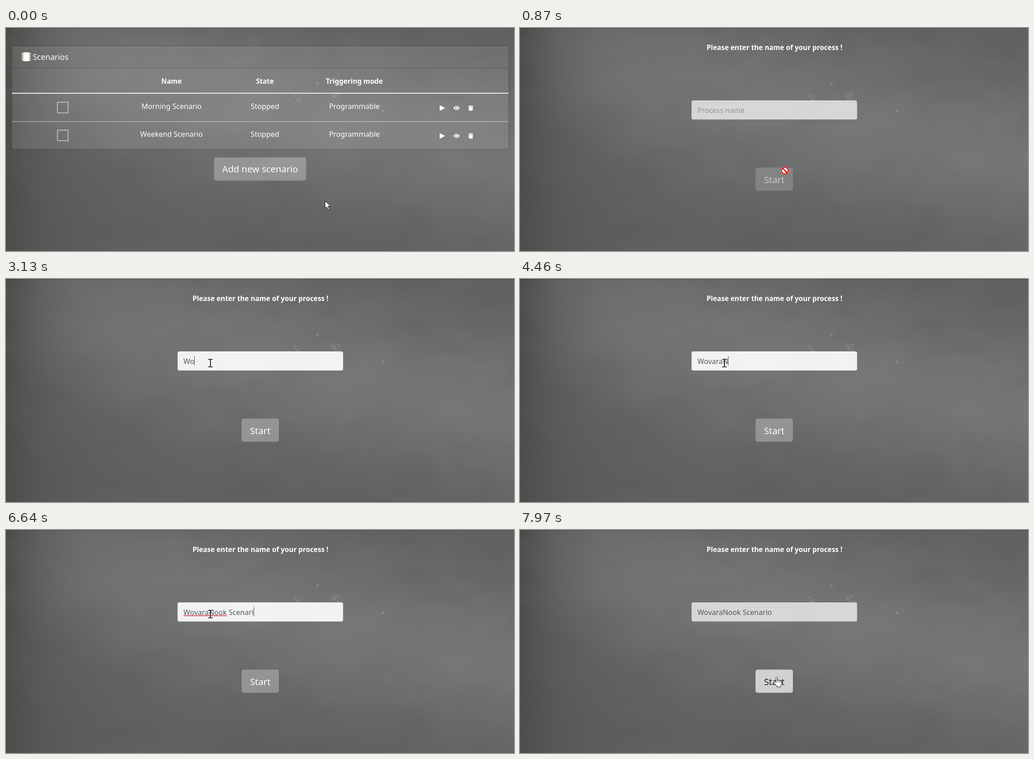
An HTML page with a canvas for the animation above (8000 ms loop, 1128 by 496 pixels).

```html
<!DOCTYPE html>
<html lang="en">
<head>
<meta charset="utf-8">
<title>New scenario</title>
<style>
html, body { margin: 0; width: 100%; height: 100%; overflow: hidden; background: #666; }
canvas { display: block; }
</style>
</head>
<body>
<canvas id="stage" width="1128" height="496"></canvas>
<script>
const W = 1128, H = 496, LOOP = 8000;
const ctx = document.getElementById('stage').getContext('2d');
const FONT = '"Noto Sans", "Open Sans", sans-serif';
const NAME = 'WovaraNook Scenario', WORD = 'WovaraNook';

const PAGE_SWITCH = 790, FOCUS = 1490, CARET_ON = 1570, ENABLE = 2660, HOVER = 7500, BLUR = 7740;
const keyTimes = [2660, 3130, 3300, 3680, 3870, 4060, 4460, 4640, 4820, 5000, 5300,
  5620, 5790, 5960, 6130, 6300, 6470, 6640, 6800];
const path = [[80, 708, 384], [500, 588, 317], [960, 588, 317], [1460, 454, 187],
  [7250, 454, 187], [7500, 594, 333], [7570, 590, 332], [7720, 570, 327]];

const clamp = v => Math.max(0, Math.min(1, v));
const mix = (a, b, k) => a + (b - a) * k;
const smooth = k => k * k * (3 - 2 * k);
const ramp = (t, start, length) => clamp((t - start) / length);
const white = a => `rgba(255,255,255,${a})`;
const gray = v => `rgb(${v},${v},${v})`;

function hash(i, j) {
  const s = Math.sin(i * 127.1 + j * 311.7) * 43758.5453;
  return s - Math.floor(s);
}

function noise(x, y) {
  const i = Math.floor(x), j = Math.floor(y), u = smooth(x - i), v = smooth(y - j);
  return mix(mix(hash(i, j), hash(i + 1, j), u), mix(hash(i, j + 1), hash(i + 1, j + 1), u), v) - 0.5;
}

// Worn wall: a slanted light band, dark left side, blocky smudges.
function wallShade(x, y) {
  const bx = Math.floor(x / 6), by = Math.floor(y / 5);
  const warp = noise(bx / 7, by / 5) * 44 + (hash(bx, by) - 0.5) * 10;
  const px = Math.max(0, x + warp * 0.3), py = y + warp;
  const d = (py - 130 - (px - 300) * 0.2) / 170;
  const band = 96 + 21 * Math.exp(-d * d);
  return mix(77, band, 1 - Math.exp(-px / 110)) + noise(x / 90, y / 50) * 4 + noise(x / 5, y / 4);
}

function makeWall() {
  const wall = document.createElement('canvas');
  wall.width = W;
  wall.height = H;
  const c = wall.getContext('2d');
  const image = c.createImageData(W, H);
  for (let y = 0, p = 0; y < H; y++) {
    for (let x = 0; x < W; x++, p += 4) {
      const l = wallShade(x, y);
      image.data[p] = image.data[p + 1] = l;
      image.data[p + 2] = l + (x < 75 ? -1 : 1);
      image.data[p + 3] = 255;
    }
  }
  c.putImageData(image, 0, 0);
  c.fillStyle = 'rgba(0,0,0,.28)';
  c.fillRect(0, 0, W, 1);
  c.fillStyle = white(0.13);
  for (const [x, y, n] of [[731, 151, 14], [645, 154, 10], [690, 122, 4], [835, 183, 4]]) {
    for (let i = 0; i < n; i++) {
      c.fillRect(x + (hash(i, x) - 0.5) * n * 1.5, y + (hash(x, i) - 0.5) * n * 1.3, 4, 2);
    }
  }
  return wall;
}
const wall = makeWall();

function text(str, x, y, size, color, align = 'center', weight = 400) {
  ctx.font = `${weight} ${size}px ${FONT}`;
  ctx.textAlign = align;
  ctx.fillStyle = color;
  ctx.fillText(str, x, y);
}

function box(x, y, w, h, radius, fill) {
  ctx.beginPath();
  ctx.roundRect(x, y, w, h, radius);
  ctx.fillStyle = fill;
  ctx.fill();
}

function bar(x, y, w, h, fill) {
  ctx.fillStyle = fill;
  ctx.fillRect(x, y, w, h);
}

function shape(d, x, y, fill, stroke, width = 1) {
  const p = new Path2D(d);
  ctx.save();
  ctx.translate(x, y);
  if (fill) { ctx.fillStyle = fill; ctx.fill(p); }
  if (stroke) { ctx.strokeStyle = stroke; ctx.lineWidth = width; ctx.stroke(p); }
  ctx.restore();
}

function disc(x, y, r, fill) {
  ctx.beginPath();
  ctx.arc(x, y, r, 0, Math.PI * 2);
  ctx.fillStyle = fill;
  ctx.fill();
}

function button(label, x, y, w, baseline, enabled, hover) {
  box(x, y, w, 51.5, 5, white(mix(mix(0.17, 0.28, enabled), 0.69, hover)));
  text(label, x + w / 2, baseline, 20.3, gray(Math.round(mix(mix(200, 255, enabled), 33, hover))));
}

function scenarioRow(name, y) {
  ctx.strokeStyle = '#d2d2d2';
  ctx.lineWidth = 1.5;
  ctx.strokeRect(114.25, y + 19.25, 23.5, 23.5);
  text(name, 367.5, y + 34, 16, '#fff');
  text('Stopped', 575, y + 34, 16.2, '#fff');
  text('Programmable', 773.5, y + 34, 16, '#fff');
  shape('M.8 0L11 5.6Q11.6 6 11 6.4L.8 12Q0 12.3 0 11.3V.7Q0-.3 .8 0Z', 963, y + 26, '#fff');
  shape('M-7 0Q-4-4.8 0-4.8T7 0Q4 4.8 0 4.8T-7 0Z', 1000.5, y + 32, '#fff');
  ctx.strokeStyle = '#808080';
  ctx.lineWidth = 1.1;
  ctx.beginPath();
  ctx.arc(1000.5, y + 32, 3, 0, Math.PI * 2);
  ctx.stroke();
  shape('M0 1H3.5L4.2 0H6.8L7.5 1H11V2.6H0ZM.8 3.4H10.2L9.6 11.2Q9.5 12 8.7 12H2.3Q1.5 12 1.4 11.2Z', 1026.5, y + 26, '#fff');
}

function listPage(t) {
  ctx.save();
  ctx.strokeStyle = 'rgba(0,0,0,.17)';
  ctx.lineWidth = 1.5;
  ctx.beginPath();
  ctx.roundRect(13, 39.5, 1103.5, 230.5, 5);
  ctx.stroke();
  ctx.restore();
  box(13, 40, 1103, 229.5, 5, white(0.105));
  box(13, 40, 1103, 49, [5, 5, 0, 0], 'rgba(0,0,0,.025)');
  bar(13, 89, 1103, 1.3, 'rgba(0,0,0,.2)');

  box(38.5, 54, 13, 20, 2, '#fffffa');
  for (let i = 0; i < 5; i++) bar(35, 55.5 + i * 3.8, 20, 2, '#fffff0');
  text('Scenarios', 59.5, 71, 17.5, '#fff', 'left');

  text('Name', 367.5, 123.5, 15.2, '#fff', 'center', 700);
  text('State', 575, 123.5, 15.2, '#fff', 'center', 700);
  text('Triggering mode', 773.5, 123.5, 15.3, '#fff', 'center', 700);
  bar(13, 144, 1103, 2.2, '#e6e6f0');
  scenarioRow('Morning Scenario', 146);
  bar(13, 207.6, 1103, 1, '#d0d0d8');
  scenarioRow('Weekend Scenario', 208);
  button('Add new scenario', 462, 288, 204.5, 321, 1, ramp(t, 340, 150));
}

function squiggle(x, end, y) {
  ctx.beginPath();
  ctx.moveTo(x, y);
  for (let i = 1; x + i * 2 <= end; i++) ctx.lineTo(x + i * 2, y + (i % 2 ? 2.2 : 0));
  ctx.strokeStyle = '#e8323c';
  ctx.lineWidth = 1.1;
  ctx.stroke();
}

function formPage(t) {
  text('Please enter the name of your process !', 565, 48.5, 15.35, '#fff', 'center', 700);
  const focus = ramp(t, FOCUS, 80) - ramp(t, BLUR, 150);
  box(381, 161, 367.5, 42.5, 4, white(mix(0.71, 0.91, focus)));

  const count = keyTimes.filter(k => k <= t).length;
  const typed = NAME.slice(0, count);
  if (count) text(typed, 394, 188.5, 16, '#55595f', 'left');
  else text('Process name', 394, 188.5, 16, '#8d97a1', 'left');

  const focused = t >= CARET_ON && t < BLUR;
  if (focused && count > WORD.length) {
    squiggle(394, 394 + ctx.measureText(WORD).width, 189.5);
  }
  const lastKey = count ? keyTimes[count - 1] : CARET_ON;
  if (focused && (t - lastKey) % 1060 < 530) {
    const end = count ? ctx.measureText(typed).width : 0;
    bar(Math.round(394 + end), 171.5, 1, 21, '#444');
  }
  button('Start', 523, 310.5, 83, 344.5, ramp(t, ENABLE, 90), ramp(t, HOVER, 150));
}

const cursors = {
  arrow(x, y) {
    shape('M0 0V16.5L3.8 13L6.5 19.3L9.3 18L6.6 12H12Z', x + 0.5, y + 0.5, '#fff', '#111');
  },
  hand(x, y) {
    shape('M5.5 13V2.5C5.5 .2 8.7 .2 8.7 2.5V8C9 6.6 11.6 6.6 11.8 8.6C12.4 7.4 14.6 7.6 14.8 9.4C15.6 8.4 17.4 8.8 17.5 10.6V15C17.5 17 16 18.5 15.5 20.5V22.5H7.5V20.8C5.5 18.5 2.5 15.5 .8 12.6C.2 11 2 10 3.4 11.2Z',
      x - 7, y - 0.5, '#fff', '#111');
    shape('M8.7 8V12M11.8 9V12M14.8 10V12.5', x - 7, y - 0.5, null, '#111');
  },
  beam(x, y) {
    const d = 'M-5-8.5H-1.5L0-7.5L1.5-8.5H5M0-7.5V7.5M-5 8.5H-1.5L0 7.5L1.5 8.5H5';
    shape(d, x, y, null, white(0.7), 3.2);
    shape(d, x, y, null, '#000', 1.7);
  },
  blocked(x, y) {
    disc(x, y, 9.3, white(0.8));
    disc(x, y, 8.7, '#d5050c');
    disc(x, y, 6.3, '#fff');
    shape('M-5-5L5 5', x, y, null, '#d5050c', 2.6);
  }
};

function pointer(t) {
  const next = path.findIndex(p => p[0] > t);
  if (next === 0) return path[0].slice(1);
  if (next < 0) return path[path.length - 1].slice(1);
  const [t0, x0, y0] = path[next - 1], [t1, x1, y1] = path[next];
  const k = smooth((t - t0) / (t1 - t0));
  return [mix(x0, x1, k), mix(y0, y1, k)];
}

function cursorKind(t, x, y) {
  const inside = (l, top, r, b) => x >= l && x <= r && y >= top && y <= b;
  if (t < PAGE_SWITCH) return inside(462, 288, 666, 339) ? 'hand' : 'arrow';
  if (inside(381, 161, 748, 203)) return 'beam';
  if (inside(523, 311, 606, 362)) return t < ENABLE ? 'blocked' : 'hand';
  return 'arrow';
}

function draw(t) {
  ctx.drawImage(wall, 0, 0);
  (t < PAGE_SWITCH ? listPage : formPage)(t);
  const [x, y] = pointer(t);
  const pressed = [[610, 760], [FOCUS, 1730], [BLUR, 7880]].some(([a, b]) => t >= a && t < b);
  if (pressed) disc(x - 1, y - 1, 13.3, 'rgba(246,238,30,.68)');
  cursors[cursorKind(t, x, y)](x, y);
}

const start = performance.now();
function tick() {
  draw((performance.now() - start) % LOOP);
  requestAnimationFrame(tick);
}
tick();
</script>
</body>
</html>
```
